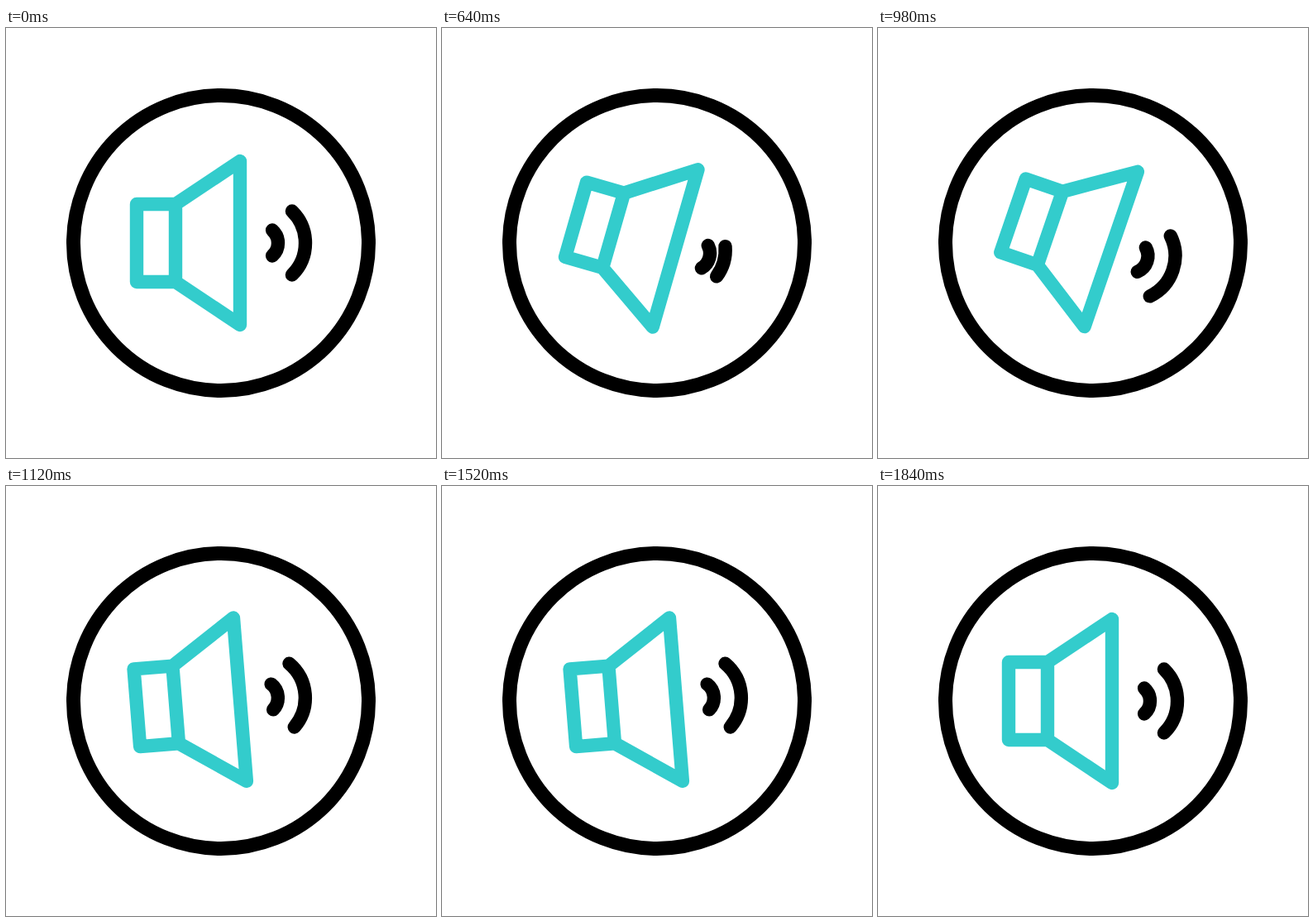
An HTML page that plays this animation: 520 px wide and 520 px high, repeating every 2.12 s.

```html
<!DOCTYPE html>
<html lang="en">
<head>
<meta charset="utf-8">
<title>Speaker</title>
<style>
  html, body { margin: 0; width: 100%; height: 100%; overflow: hidden; background: #fff; }
  svg { display: block; width: 100vw; height: 100vh; fill: none; stroke-linecap: round; stroke-linejoin: round; }
</style>
</head>
<body>
<svg viewBox="0 0 520 520">
  <circle cx="260" cy="260" r="178.5" stroke="#000" stroke-width="17"/>
  <g id="swing" stroke-width="16.4">
    <path stroke="#33cccc" d="M205 213H158V307H205ZL283 161V359L205 307"/>
    <g stroke="#000">
      <path id="inner"/>
      <path id="outer"/>
    </g>
  </g>
</svg>
<script>
  const STEP = 20, STEPS = 106;
  const SHUT = 15, WAKE = 20, BEAT = 10, BEATS = 6, REST = 92;
  const RIGHT = 20, LEFT = -18, DOT_X = 298;
  const get = id => document.getElementById(id);

  // Smooth progress from 0 to 1 between steps a and b.
  function ease(n, a, b) {
    const u = Math.min(1, Math.max(0, (n - a) / (b - a)));
    return u * u * (3 - 2 * u);
  }

  // Alternating swings, starting and ending upright.
  function angle(n) {
    const side = k => k === 0 || k > BEATS ? 0 : k % 2 ? RIGHT : LEFT;
    const k = Math.min(BEATS, Math.max(0, Math.floor((n - WAKE) / BEAT)));
    const from = WAKE + k * BEAT;
    const to = k === BEATS ? REST : from + BEAT;
    return side(k) + (side(k + 1) - side(k)) * ease(n, from, to);
  }

  // Each wave shrinks into a dot, then slides out and unfolds.
  function drawWave(id, n, { cx, r, half, slideEnd, openStart }) {
    const closing = 1 - ease(n, 0, SHUT);
    const slide = closing + ease(n, WAKE, slideEnd);
    const open = closing + ease(n, openStart, openStart + SHUT);
    const shift = (cx + r - DOT_X) * (1 - slide);
    const turn = Math.max(0.02, half * open) * Math.PI / 180;
    const x = cx - shift + r * Math.cos(turn), dy = r * Math.sin(turn);
    get(id).setAttribute('d', `M${x} ${260 - dy}A${r} ${r} 0 0 1 ${x} ${260 + dy}`);
  }

  function draw(ms) {
    const n = Math.floor(ms / STEP) % STEPS;
    get('swing').setAttribute('transform', `rotate(${angle(n)} 260 260)`);
    drawWave('inner', n, { cx: 308.2, r: 20.8, half: 48, slideEnd: 35, openStart: 20 });
    drawWave('outer', n, { cx: 307.8, r: 54.2, half: 45.3, slideEnd: 38.5, openStart: 25 });
  }

  const start = performance.now();
  function tick() {
    draw(performance.now() - start);
    requestAnimationFrame(tick);
  }
  tick();
</script>
</body>
</html>
```
